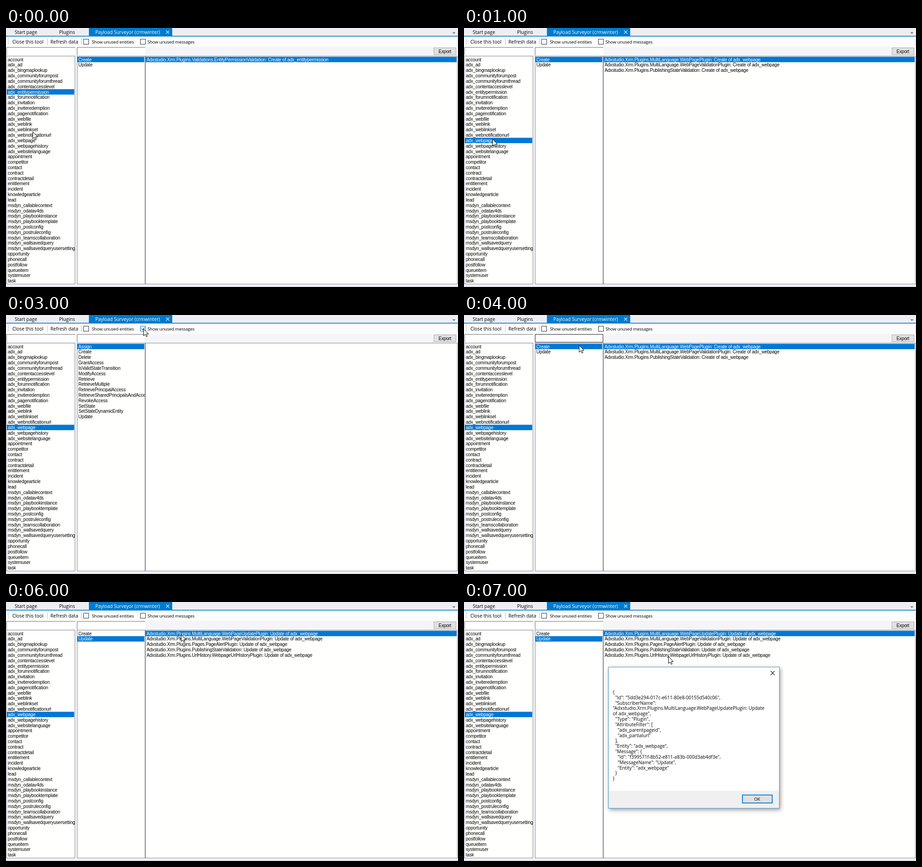
These frames come from a looping animation (987 by 567 pixels, 8 s). An HTML page:

```html
<!DOCTYPE html>
<html lang="en">
<head>
<meta charset="utf-8">
<style>
html, body { margin: 0; width: 100%; height: 100%; overflow: hidden; background: #f5f5f7; }
svg { display: block; }
text { white-space: pre; }
.ui { font: 10.3px "Open Sans", sans-serif; }
.label { font: 9.5px "Open Sans", sans-serif; letter-spacing: -.15px; }
.dialog { font: 10.1px "Open Sans", sans-serif; }
.list { font: 10px "Liberation Sans", Arial, sans-serif; letter-spacing: -.2px; }
</style>
</head>
<body>
<svg id="stage" width="987" height="567" viewBox="0 0 987 567"></svg>
<script>
const ROW = 11.82, BLUE = '#0078d7', BORDER = '#828790';

const entities = `account adx_ad adx_bingmaplookup adx_communityforumpost
  adx_communityforumthread adx_contentaccesslevel adx_entitypermission
  adx_forumnotification adx_invitation adx_inviteredemption adx_pagenotification
  adx_webfile adx_weblink adx_weblinkset adx_webnotificationurl adx_webpage
  adx_webpagehistory adx_websitelanguage appointment competitor contact contract
  contractdetail entitlement incident knowledgearticle lead msdyn_callablecontext
  msdyn_odatav4ds msdyn_playbookinstance msdyn_playbooktemplate msdyn_postconfig
  msdyn_postruleconfig msdyn_teamscollaboration msdyn_wallsavedquery
  msdyn_wallsavedqueryusersetting opportunity phonecall postfollow queueitem
  systemuser task`.split(/\s+/);
const usedMessages = ['Create', 'Update'];
const allMessages = `Assign Create Delete GrantAccess IsValidStateTransition ModifyAccess
  Retrieve RetrieveMultiple RetrievePrincipalAccess RetrieveSharedPrincipalsAndAccess
  RevokeAccess SetState SetStateDynamicEntity Update`.split(/\s+/);

const plugins = (message, entity, names) =>
  names.map(name => `Adxstudio.Xrm.Plugins.${name}: ${message} of ${entity}`);
const permissionPlugins = plugins('Create', 'adx_entitypermission',
  ['Validations.EntityPermissionValidation']);
const createPlugins = plugins('Create', 'adx_webpage', ['MultiLanguage.WebPagePlugin',
  'MultiLanguage.WebPageValidationPlugin', 'PublishingStateValidation']);
const updatePlugins = plugins('Update', 'adx_webpage', ['MultiLanguage.WebPageUpdatePlugin',
  'MultiLanguage.WebPageValidationPlugin', 'Pages.PageAlertPlugin',
  'PublishingStateValidation', 'UrlHistory.WebpageUrlHistoryPlugin']);

const details = `{
  "Id": "5dd3e294-017c-e611-80e8-00155d540c06",
  "SubscriberName":
"Adxstudio.Xrm.Plugins.MultiLanguage.WebPageUpdatePlugin: Update
of adx_webpage",
  "Type": "Plugin",
  "AttributeFilter": [
    "adx_parentpageid",
    "adx_partialurl"
  ],
  "Entity": "adx_webpage",
  "Message": {
    "Id": "f399571f-8b52-e811-a83b-000d3ab4df3e",
    "MessageName": "Update",
    "Entity": "adx_webpage"
  }
}`.split('\n');

// One state per second; -1 means nothing is selected.
const base = { entity: 15, messages: usedMessages, message: 0, plugins: createPlugins, plugin: 0 };
const updated = { ...base, message: 1, plugins: updatePlugins };
const states = [
  { ...base, entity: 6, plugins: permissionPlugins, cursor: [58, 227] },
  { ...base, cursor: [62, 243] },
  { ...base, message: -1, plugin: -1, hover: true, cursor: [298, 30] },
  { ...base, messages: allMessages, plugins: [], hover: true, checked: true, cursor: [300, 30] },
  { ...base, focus: true, cursor: [251, 66] },
  { ...updated, cursor: [251, 77] },
  { ...updated, cursor: [382, 71] },
  { ...updated, dialog: true, cursor: [446, 119] },
];

const rect = (x, y, w, h, fill, stroke = 'none', width = 1) =>
  `<rect x="${x}" y="${y}" width="${w}" height="${h}" fill="${fill}" stroke="${stroke}" stroke-width="${width}"/>`;
const path = (d, stroke, width = 1, fill = 'none') =>
  `<path d="${d}" stroke="${stroke}" stroke-width="${width}" fill="${fill}"/>`;
const text = (x, y, value, style, fill = '#000') =>
  `<text x="${x}" y="${y}" class="${style}" fill="${fill}">${value}</text>`;

function list(x, width, items, selected, indent) {
  const rows = items.map((item, i) =>
    (i === selected ? rect(1, i * ROW, width - 3, ROW, BLUE) : '') +
    text(indent, i * ROW + 9.6, item, 'list', i === selected ? '#fff' : '#000')).join('');
  return rect(x + .5, 61.5, width - 1, 499, '#fffffd', BORDER) +
    `<svg x="${x}" y="63" width="${width - 1}" height="497">${rows}</svg>`;
}

const searchBox = (x, width) =>
  rect(x, 42, width, 18, '#fff') + path(`M${x + .5} 60V42.5H${x + width}`, '#777');

const checkBox = (x, hover, checked) =>
  rect(x + .5, 24.5, 11, 11, '#fff', hover ? BLUE : '#333') +
  (checked ? path(`M${x + 2.5} 30l2.5 2.5 5-5.5`, BLUE, 1.3) : '');

const frame =
  rect(0, 0, 987, 17, '#eeeef2') + rect(181, 0, 182, 18, '#007acc') + rect(0, 17, 987, 1.6, '#007acc') +
  text(19, 13, 'Start page', 'ui') + text(116, 13, 'Plugins', 'ui') +
  text(195, 13, 'Payload Surveyor (crmwinter)', 'ui', '#fff') +
  path('M349.5 5.5l7 7m0-7l-7 7', '#d5eaf8', 1.2) +
  path('M974.5 9.5h7l-3.5 3.5z', 'none', 0, '#717171') +
  rect(0, 19, 986, 22, '#fcfcfc') + path('M985.5 21V40', '#ddd') +
  `<path d="M5 23V37" stroke="#aaa" stroke-width="1.5" stroke-dasharray="1.5 2"/>` +
  text(14, 33.5, 'Close this tool', 'ui') + text(97, 33.5, 'Refresh data', 'ui') +
  path('M90.5 23V37M164.5 23V37', '#c5c5c5') +
  text(187.5, 33.5, 'Show unused entities', 'label') +
  text(309, 33.5, 'Show unused messages', 'label') +
  searchBox(1, 150) + searchBox(155, 149) +
  rect(934.5, 43.5, 48, 15, '#e1e1e1', '#adadad') + text(944.5, 55.3, 'Export', 'list') +
  path('M0 565.5H987', '#c8c8d0');

const dialog =
  `<g style="filter:drop-shadow(2px 3px 5px #0006)">${rect(315.5, 142.5, 373, 309, '#fff', '#4a9cc8')}</g>` +
  rect(316, 413, 372, 38, '#f0f0f0') +
  path('M669.5 151l9 9m0-9l-9 9', '#222', 1.1) +
  details.map((line, i) => text(325, 201 + i * 11.83, line, 'dialog')).join('') +
  rect(608, 422.5, 65, 17.5, '#e1e1e1', BLUE, 1.8) + text(633.5, 435.2, 'OK', 'label');

const cursor = ([x, y]) => `<g transform="translate(${x + .5} ${y + .5})">` +
  path('M0 0V15L3.5 11.8L6 17L8.2 16L5.9 10.9H10.6Z', '#000', 1, '#fff') + '</g>';

const render = s => frame +
  checkBox(169, false, false) + checkBox(293, s.hover, s.checked) +
  (s.focus ? rect(155.5, 42.5, 148, 17, '#fff', '#222') : '') +
  list(1, 150, entities, s.entity, 3) +
  list(155, 149, s.messages, s.message, 3) +
  list(304, 682, s.plugins, s.plugin, 3) +
  (s.dialog ? dialog : '') + cursor(s.cursor);

const stage = document.getElementById('stage');
let shown = -1;
function tick() {
  const index = Math.floor(performance.now() / 1000) % states.length;
  if (index !== shown) stage.innerHTML = render(states[shown = index]);
  requestAnimationFrame(tick);
}
tick();
</script>
</body>
</html>
```
